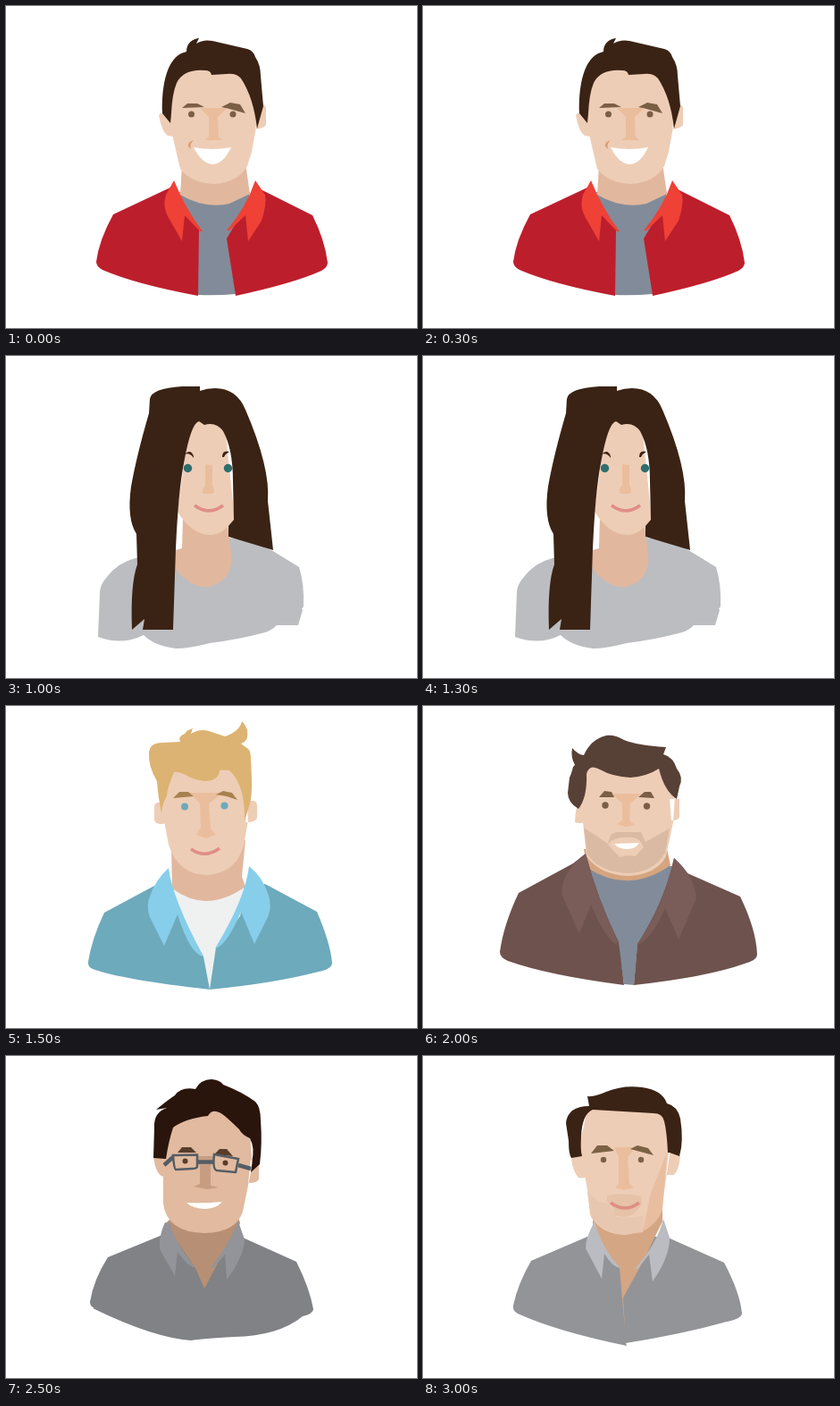
Recreate the animation shown at these times as an HTML page. Size 460x360 px, loop 3.5 s.

```html
<!DOCTYPE html>
<html lang="en">
<head>
<meta charset="utf-8">
<title>Portraits</title>
<style>
html, body { margin: 0; height: 100%; overflow: hidden; background: #fff; }
svg { display: block; width: 100vw; height: 100vh; }
svg > g { display: none; }
svg > g.on { display: block; }
.skin { fill: #eecdb6; }
.neck { fill: #e1b89e; }
.nose { fill: #eabe9c; }
.dark { fill: #3a2314; }
.brow { fill: #7b5f44; }
.white { fill: #fff; }
.lips { fill: none; stroke: #e08e85; stroke-width: 3.5; }
</style>
</head>
<body>
<svg viewBox="0 0 460 360">
  <!-- red jacket -->
  <g class="on">
    <path fill="#828b99" d="M194 208H273L268 230 248 260 257 322Q236 324 215 323L214 250 200 230Z"/>
    <path class="neck" d="M197 178L268 176 273 210 250 221Q222 227 195 211Z"/>
    <path fill="#bd1e2c" d="M120 233L186 202 216 250 215 324Q145 311 108 295 101 291 101 286 104 262 120 233ZM343 234L281 203 247 260 257 324Q322 310 353 296 360 292 360 287 357 262 343 234Z"/>
    <path fill="#ef4136" d="M188 195L179 211Q175 223 181 235L197 263 200 234 217 252H220Q201 227 188 195ZM279 195L290 211Q292 222 286 240L271 263 268 234 250 251H247Q269 225 279 195Z"/>
    <path class="skin" d="M188 66L181 120 187 148 195 182Q207 198 233 199 260 197 270 179L275 163 281 130 266 66ZM183 122Q173 117 171 122 174 140 181 145L188 146ZM285 111Q291 109 291 115V133Q287 138 279 137Z"/>
    <path class="dark" d="M175 120C174 95 178 62 196 53L202 51C202 42 208 37 216 36L213 42Q221 37 231 39L270 48Q277 50 279 57 285 66 285 78L288 112 281 137Q277 102 263 81 258 75 247 76L230 77Q229 72 223 72 199 70 191 86 186 98 185 120L184 131Z"/>
    <g class="brow">
      <path d="M197 114L203 109H214L222 113ZM241 113L251 108 262 110 268 120 250 115Z"/>
      <circle cx="207.500" cy="121" r="3.500"/><circle cx="254" cy="121" r="3.500"/>
    </g>
    <path class="nose" d="M217 114H248L237 124 238 146 242 150H222L227 146V124Z"/>
    <path fill="#d99c6c" d="M210 150Q203 152 204 157L207 160Q205 154 210 150Z"/>
    <path class="white" d="M210 158Q231 162 252 158 243 177 231 177 219 176 210 158Z"/>
  </g>

  <!-- ponytail -->
  <g>
    <path class="neck" d="M127 250L125 274Q145 301 175 312V250ZM319 236L328 274Q312 295 291 305L296 240Z"/>
    <path fill="#ddaeb9" d="M119 251Q120 232 133 224L131 252ZM195 190L263 182Q300 190 318 204L336 217 333 229Q325 240 301 244V286Q300 292 293 298L295 312Q270 323 235 327 190 330 171 309L158 260Z"/>
    <path class="neck" d="M197 165L260 163 267 206Q267 213 258 217 233 227 206 219 200 216 202 208Z"/>
    <path class="skin" d="M184 70L178 115 186 135 190 164Q198 183 225 184 247 183 257 165L265 130 268 75 220 60ZM171 112V133Q171 137 184 135V119ZM270 117Q279 114 279 120L277 137Q271 142 264 138Z"/>
    <path fill="#e9c3a8" d="M266 122L258 142 252 178 259 164 266 138Z"/>
    <path fill="#a97c50" d="M186 121C170 114 163 98 159 82Q157 69 163 61L194 32Q203 25 212 27L262 40Q272 43 274 56 280 86 276 110 263 136 271 160 265 152 265 132 266 122 269 108 270 98 261 86 256 75 253 70 241 66 235 73 231 63 219 63 204 63 196 70L184 83Q182 92 178 106 178 116 186 121ZM188 163Q175 180 147 184 137 184 134 195 129 215 130 240 132 260 136 274 137 254 147 250 138 259 144 270 150 284 166 293 166 284 161 272V258Q163 246 180 237 200 226 199 195V175Q195 168 188 163Z"/>
    <path fill="#a97c50" d="M187 107L195 98 205 97 213 103 198 105ZM232 103L242 98 253 101 259 109 245 105Z"/>
    <g fill="#63abbd"><circle cx="201" cy="114" r="4.500"/><circle cx="243" cy="114.500" r="4.500"/></g>
    <path class="nose" d="M219 110H226L227 132Q231 137 227 140 222 142 218 140 214 137 219 132Z"/>
    <path class="lips" d="M208 153Q223 165 238 153"/>
  </g>

  <!-- long hair -->
  <g>
    <path fill="#bcbdc1" d="M103 314L105 265Q105 256 113 247 125 231 145 226L190 217 248 203Q275 205 297 217L328 236Q334 255 333 280L331 283 332 284 327 301H303Q297 307 290 309 260 317 228 321 205 327 190 327 166 324 154 312 130 324 103 314Z"/>
    <path class="neck" d="M198 180L248 188 252 222Q254 236 246 247 226 268 202 250 190 242 189 234V218L197 215Z"/>
    <path class="skin" d="M206 68H244L256 182Q243 200 228 200 207 199 192 174Z"/>
    <g fill="#2f6e6c"><circle cx="203.500" cy="125.500" r="4.700"/><circle cx="248.500" cy="125.500" r="4.700"/></g>
    <path class="dark" d="M217 34H197Q163 36 161 48L160 64Q146 112 140 146 135 182 146 199L147 233Q139 255 141 306L155 294 153 306H187L190 215Q193 150 199 120 207 75 216 73L222 77Q235 73 243 84 254 104 254 140L255 183 249 190V202L299 217 293 162Q296 125 268 60 258 36 234 36 225 36 217 39ZM201 109Q207 104 210 112L210 114Q207 109 201 109ZM242 113Q242 105 250 107 246 109 244 113Z"/>
    <path class="nose" d="M223 121L231 122V145Q235 150 231 154H221Q218 149 223 145Z"/>
    <path class="lips" d="M211 167Q227 179 243 167"/>
  </g>

  <!-- blond hair, blue jacket -->
  <g>
    <path fill="#6daabc" d="M110 231L166 201 186 204H268L290 199 348 230Q363 265 365 287 365 294 350 297 300 310 228 317 130 306 97 294 91 291 92 286 96 260 110 231Z"/>
    <path fill="#eff1f1" d="M184 202H269L262 235 235 270 228 317 221 280 190 225Z"/>
    <path class="neck" d="M185 160L268 150 264 191 268 202Q245 218 224 218 205 218 186 204Z"/>
    <path fill="#87ceea" d="M182 181Q186 215 221 280 206 278 192 233L177 268 161 236Q156 223 162 210 168 194 182 181ZM272 179Q268 215 234 271 247 268 263 230L278 266 293 236Q298 225 294 212 288 192 272 179Z"/>
    <path class="skin" d="M182 68L175 118 182 155Q192 188 225 189 257 187 266 156L271 128 267 65ZM176 109Q166 105 166 114V127Q167 134 179 131ZM268 108Q281 102 281 112V124Q281 130 268 130Z"/>
    <path fill="#dcb372" d="M174 120Q170 100 169 84 159 67 160 52 161 41 175 41L195 40Q192 34 200 31 202 27 209 25L207 31Q217 25 227 28L245 34Q262 28 264 17 272 25 270 35 269 40 263 42L271 48Q274 50 274 60 276 90 274 105L267 129Q267 112 265 101 261 82 250 72 242 71 239 72 238 84 222 84 208 82 201 77 192 73 188 74 181 90 180 100 175 110 174 120Z"/>
    <path class="nose" d="M205 97H243L227 109 229 137 235 144 224 148 213 144 218 136 217 109Z"/>
    <path fill="#a6824e" d="M187 103L194 96H204L210 101ZM235 99L243 95 253 97 259 105 247 101Z"/>
    <g fill="#6daabc"><circle cx="200" cy="112.500" r="4"/><circle cx="244.500" cy="111.500" r="4"/></g>
    <path class="lips" d="M207 160Q223 171 239 159"/>
  </g>

  <!-- beard, brown jacket -->
  <g>
    <path fill="#828b99" d="M183 179H279L268 225 240 268 236 312 225 311 218 264 192 215Z"/>
    <path fill="#d4a57f" d="M180 160L184 181Q230 211 277 178L273 160Z"/>
    <path fill="#6e524e" d="M107 209L168 176 182 165Q195 215 219 264L225 312Q140 301 95 285 86 281 86 275 90 245 107 209ZM296 187L355 213Q373 250 374 278 374 284 360 288 318 303 236 312L240 266Q270 220 281 170Z"/>
    <path fill="#7a5c58" d="M182 165Q155 185 155 210L175 255 188 222Q205 262 217 267L218 263Q195 215 182 165ZM281 170Q304 190 306 215L286 261 271 226Q255 262 240 267 270 220 281 170Z"/>
    <path class="skin" d="M183 66L176 100 179 130 183 168Q198 189 230 190 262 188 272 168L280 130 282 100 268 66ZM178 100Q170 112 170 130 175 132 180 130ZM276 104H287V124Q286 128 278 128Z"/>
    <path fill="#dbbaa4" d="M180 136L207 154 210 144 216 141H244L249 152 276 137 271 164Q258 186 230 187 198 186 184 166Z"/>
    <path class="skin" d="M207 155Q212 146 229 147 242 145 247 158L238 168 229 167 220 169Z"/>
    <path fill="#574036" d="M174 115Q162 108 162 97L164 80Q166 76 168 68L170 66Q165 57 167 47 173 54 180 55 188 37 205 33 215 32 225 38 240 44 272 46L269 54Q280 57 284 70 292 80 287 90L284 104Q270 95 264 70 250 79 232 80 212 79 198 71 186 64 183 76 184 102 174 115Z"/>
    <path class="nose" d="M211 98H244L232 109 231 128 237 133 227 135 217 132 223 128V109Z"/>
    <g class="brow">
      <path d="M197 102L203 95 211 96 214 102ZM241 102L248 96H255L259 103Z"/>
      <circle cx="204" cy="111" r="3.700"/><circle cx="250.500" cy="112" r="3.700"/>
    </g>
    <path class="white" d="M214 154L242 153Q238 160 229 160 219 160 214 154Z"/>
  </g>

  <!-- glasses -->
  <g>
    <path fill="#808285" d="M114 225L175 200 265 203 325 230Q340 260 344 283 344 288 332 291 305 313 255 314 220 316 207 318 165 315 97 282L99 282Q94 280 94 275 98 250 114 225Z"/>
    <path fill="#b78f74" d="M186 180H260L262 187 240 226 222 260 212 237 178 188Z"/>
    <path fill="#929499" d="M178 186Q171 200 172 216L189 246 192 219Q203 235 212 237 190 210 183 187ZM260 185L267 205Q266 225 247 250L245 222 232 237H229Q250 210 260 185Z"/>
    <path fill="#e1ba9f" d="M184 60L176 120V165Q180 197 222 198 258 197 265 174L276 120 272 75 230 57ZM165 113Q168 135 178 135V112ZM283 118V137Q283 142 271 142L274 116Z"/>
    <path fill="#2a150c" d="M165 114L166 80Q165 63 180 58L168 60Q180 50 189 44 196 34 212 37 218 26 230 26 240 27 243 32 264 40 279 51 285 57 285 72 287 98 284 121L274 130Q278 110 273 92 264 88 261 82 254 75 246 68 232 56 226 67 200 70 187 80 182 95 179 115Z"/>
    <path class="white" d="M273 92Q279 104 275 117 275 103 273 92Z"/>
    <path fill="#c79d82" d="M213 112H233L229 124V145L238 147 225 149 210 146 217 143V124Z"/>
    <g fill="#5a3d2b">
      <path d="M192 108L197 102H207L213 108ZM233 110L239 104H247L254 112Z"/>
      <circle cx="200.500" cy="117.500" r="3"/><circle cx="245.500" cy="119.500" r="3"/>
    </g>
    <g fill="none" stroke="#555d64" stroke-width="2.500">
      <path d="M187 111L214 110.500V124Q213 126 208 126L190 127Q188 126 187 111ZM233 110L260 115 257 130 236 128Q231 127 233 110Z"/>
      <path stroke-width="4.500" d="M177 122L187 113M214 118.500H232M260 122L274 126"/>
    </g>
    <path class="white" d="M202 164Q222 165 242 163 235 171 222 171 208 170 202 164Z"/>
  </g>

  <!-- grey shirt -->
  <g>
    <path fill="#939498" d="M121 229L184 202H272L337 231Q355 265 357 288 356 294 340 297 290 311 227 321L228 324Q150 308 106 288 100 285 101 279 106 255 121 229Z"/>
    <path fill="#d5a683" d="M190 180L268 172V185L245 232 224 270 226 305 220 237Q200 215 190 190Z"/>
    <path fill="#bbbcc1" d="M192 185Q182 203 182 215L200 249 203 221Q212 236 221 237 200 215 192 185ZM269 182L276 203Q276 225 257 252L253 222 240 238H237Q262 210 269 182Z"/>
    <path class="skin" d="M185 56L175 100 184 150 188 180Q200 199 226 200 258 196 267 172L276 110 272 58ZM166 112Q166 125 173 135 176 138 183 135L179 110ZM275 108Q286 106 288 112 286 130 280 133L272 133Z"/>
    <path fill="#e8c7b0" d="M184 151Q195 165 208 165L216 180Q234 182 247 178L246 197Q200 205 187 177Z"/>
    <path fill="#e9bea0" d="M273 108L255 153Q250 175 246 196 262 188 268 172Z"/>
    <path fill="#e6c2a9" d="M206 156Q225 152 244 157L245 166Q236 180 225 180L214 178Q216 170 206 163Z"/>
    <path class="dark" d="M166 114Q163 110 163 95L160 75Q162 56 186 56L184 45Q192 46 205 40 225 32 245 35 268 38 273 53 285 56 288 70 292 95 287 112L276 108H274Q273 85 270 73 268 64 258 64L190 60Q178 65 177 90 176 105 178 112Z"/>
    <path class="nose" d="M214 102H238L229 113 231 143 236 147 225 150 215 147 219 143V113Z"/>
    <g fill="#7b6244">
      <path d="M188 109L195 100H206L214 106ZM232 104L240 100 252 103 258 111Z"/>
      <circle cx="202" cy="116" r="3.200"/><circle cx="244" cy="116" r="3.200"/>
    </g>
    <path class="lips" d="M210 164Q226 176 242 164"/>
  </g>
</svg>
<script>
const portraits = [...document.querySelectorAll('svg > g')];
const HOLD = 500;

function draw() {
  const current = Math.floor(performance.now() / HOLD) % portraits.length;
  portraits.forEach((portrait, i) => portrait.classList.toggle('on', i === current));
  requestAnimationFrame(draw);
}
draw();
</script>
</body>
</html>
```
